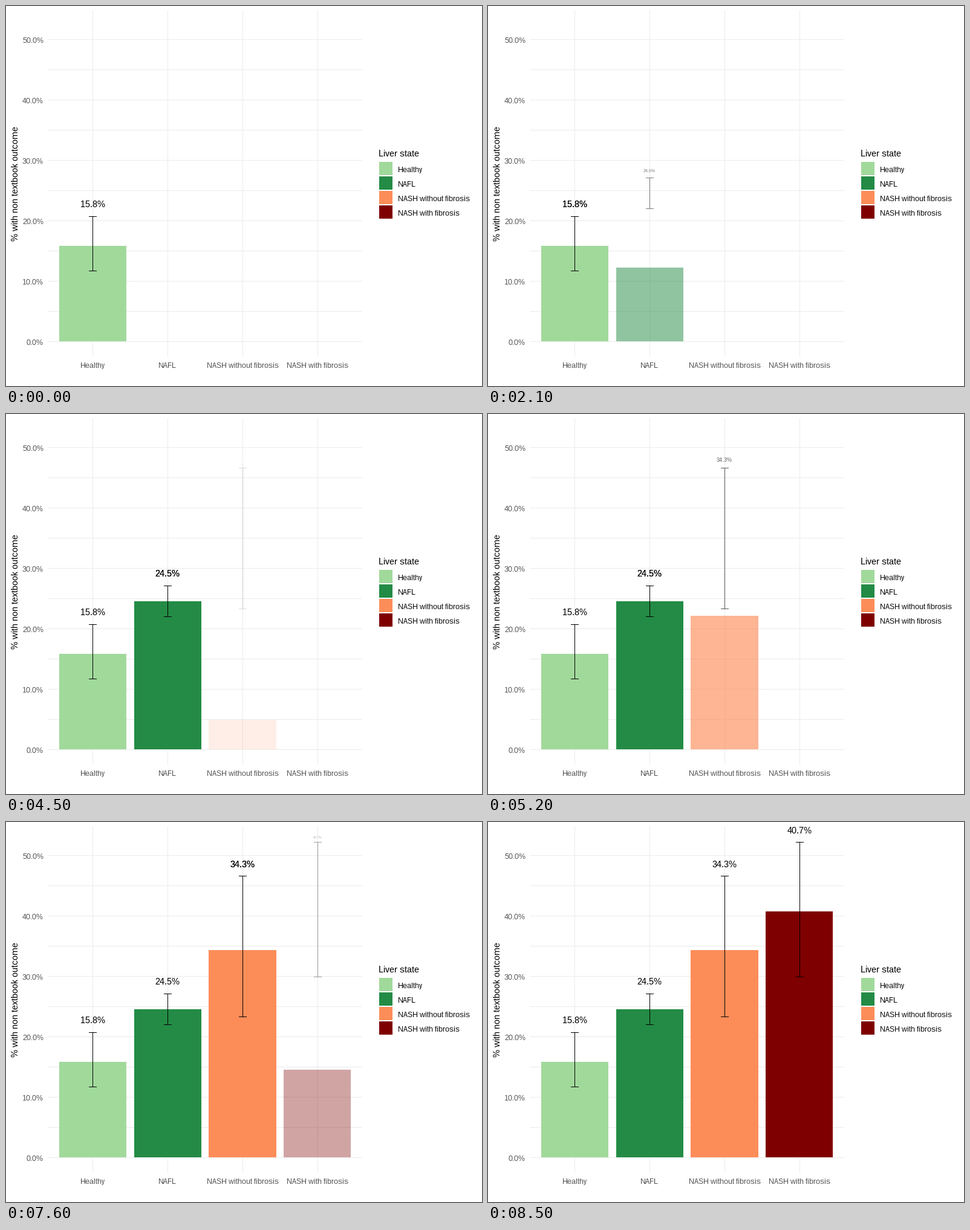
Write a matplotlib script that moves like this. It is 787 px wide and 629 px high and loops after 10000 ms.

```python
import matplotlib.pyplot as plt
from matplotlib.animation import FuncAnimation
from matplotlib.patches import Rectangle

W, H, DPI = 787, 629, 64
PX = 72 / DPI              # one pixel in points
STEPS = 14                 # frames each bar needs to appear
BASE = 555                 # pixel row of 0 %
GREY, GRID = "#4D4D4D", "#EBEBEB"

plt.rcParams.update({
    "font.family": "Liberation Sans",
    "text.hinting": "native",
    "text.hinting_factor": 1,
})

# name, colour, percent, left, right, centre, error top, error bottom, first frame
BARS = [
    ("Healthy", "#A1D99B", 15.8, 88, 199, 143, 348, 438, -STEPS),
    ("NAFL", "#238B45", 24.5, 212, 323, 267, 284, 335, 15),
    ("NASH without fibrosis", "#FC8D59", 34.3, 335, 447, 391, 89.6, 322, 44),
    ("NASH with fibrosis", "#7F0000", 40.7, 459, 570, 515, 33.6, 256, 72),
]

fig = plt.figure(figsize=(W / DPI, H / DPI), dpi=DPI, facecolor="white")
ax = fig.add_axes([0, 0, 1, 1])
ax.set_xlim(0, W)
ax.set_ylim(H, 0)
ax.axis("off")


def text(x, y, s, size=12, color="black", ha="left", **kw):
    return ax.text(x, y, s, fontsize=size * PX, color=color, ha=ha,
                   va="baseline", **kw)


def line(xs, ys, color, z):
    return ax.plot(xs, ys, color=color, lw=PX, zorder=z, snap=False,
                   solid_capstyle="butt")[0]


def box(x, y, w, h, color, z=2):
    return ax.add_patch(Rectangle((x, y), w, h, facecolor=color, lw=0,
                                  zorder=z, antialiased=False))


def error_bar(x, top, bottom):
    gap = float("nan")
    l, r, c = x - 6, x + 7, x + 0.5
    t, b = int(top) + 0.5, bottom + 0.5
    return line([l, r, gap, c, c, gap, l, r],
                [t, t, gap, t, b, gap, b, b], "black", 4)


def draw_static():
    for i in range(11):
        y = BASE - 50 * i
        line([69, 589], [y + 0.5] * 2, GRID, 1)
        if i % 2 == 0:
            text(62, y + 6, f"{5 * i:.1f}%", color=GREY, ha="right")
    text(20, 294, "% with non textbook outcome", 15, ha="center",
         rotation=90, rotation_mode="anchor")
    text(616, 249, "Liver state", 15)
    for i, (name, color, _, _, _, x, *_) in enumerate(BARS):
        line([x + 0.5] * 2, [7, 581], GRID, 1)
        text(x, 599, name, color=GREY, ha="center")
        box(617, 258 + 24 * i, 22, 22, color)
        text(648, 275 + 24 * i, name)


class Bar:
    def __init__(self, name, color, value, left, right, x, top, bottom, start):
        self.value, self.top, self.start = value, top, start
        self.rect = box(left, BASE, right - left, 0, color)
        self.error = error_bar(x, top, bottom)
        # the second copy darkens the label while the next bar grows
        self.labels = [text(x, top, f"{value}%", 15, ha="center", zorder=5)
                       for _ in range(2)]

    def progress(self, frame):
        return min(max(frame - self.start + 1, 0), STEPS) / STEPS

    def update(self, frame, doubled):
        p = self.progress(frame)
        height = round(10 * self.value * p)
        self.rect.set_y(BASE - height)
        self.rect.set_height(height)
        for label in self.labels:
            label.set_fontsize(max(int(15 * p), 2) * PX)
            label.set_y(round(self.top - 2.5 - 12.3 * p))
        for part in (self.rect, self.error, *self.labels):
            part.set_alpha(p)
            part.set_visible(p > 0)
        self.labels[1].set_visible(doubled)


draw_static()
bars = [Bar(*spec) for spec in BARS]


def update(frame):
    for bar, following in zip(bars, bars[1:] + [None]):
        doubled = following is not None and 0 < following.progress(frame) < 1
        bar.update(frame, doubled)
    return []


anim = FuncAnimation(fig, update, frames=100, interval=100,
                     init_func=lambda: update(0), repeat=True,
                     repeat_delay=0, blit=False)
plt.show()
```
